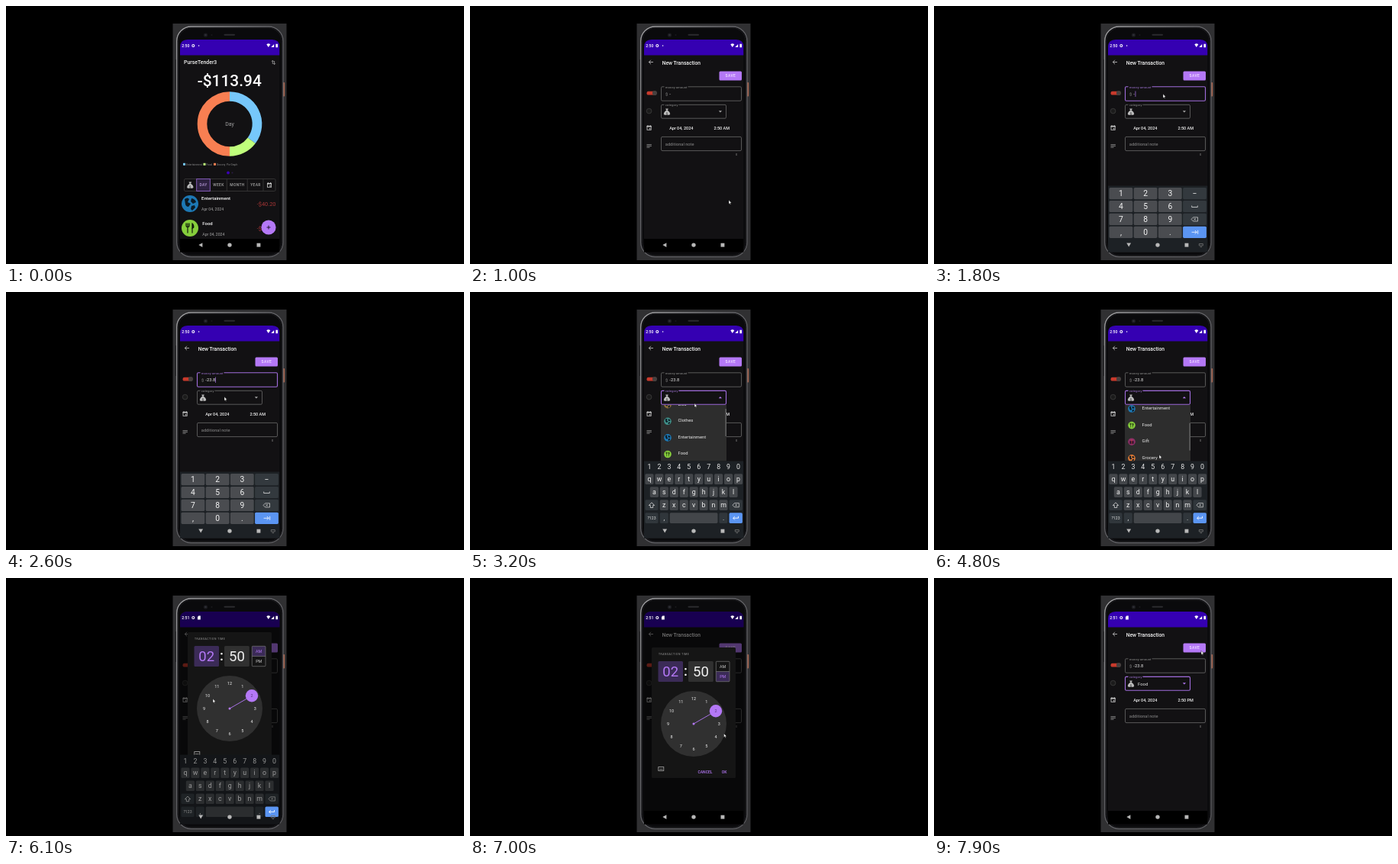
Write an HTML page that moves like this. It is 600x338 px and loops after 8000 ms.

```html
<!DOCTYPE html>
<html lang="en">
<head>
<meta charset="utf-8">
<title>Budget app</title>
<style>
html, body { margin: 0; width: 100%; height: 100%; overflow: hidden; background: #000; }
svg { display: block; width: 100vw; height: 100vh; font-family: Roboto, sans-serif; }
</style>
</head>
<body>
<svg id="stage" viewBox="0 0 600 338"></svg>
<script>
const LOOP = 8000;
const PURPLE = '#b478f6', PALE = '#e6e6e6', GREY = '#8c8c8c', DARK = '#121113';

// Markup helpers
const text = (x, y, s, size, fill = PALE, o = '') =>
  `<text x="${x}" y="${y}" font-size="${size}" fill="${fill}" ${o}>${s}</text>`;
const mid = (x, y, s, size, fill = PALE, o = '') => text(x, y, s, size, fill, `text-anchor="middle" ${o}`);
const rect = (x, y, w, h, fill, o = '') =>
  `<rect x="${x}" y="${y}" width="${w}" height="${h}" fill="${fill}" ${o}/>`;
const circle = (x, y, r, fill, o = '') => `<circle cx="${x}" cy="${y}" r="${r}" fill="${fill}" ${o}/>`;
const line = (d, stroke = PALE, w = 1, o = '') =>
  `<path d="${d}" fill="none" stroke="${stroke}" stroke-width="${w}" ${o}/>`;
const shape = (d, fill, o = '') => `<path d="${d}" fill="${fill}" ${o}/>`;
const group = (id, body, o = '') => `<g id="${id}" ${o}>${body}</g>`;
const BOLD = 'font-weight="500"';
const polar = (cx, cy, r, turn) => {
  const a = turn * 2 * Math.PI;
  return [cx + r * Math.sin(a), cy - r * Math.cos(a)];
};

const calendar = (x, y, c = PALE) =>
  rect(x - 2.6, y - 2.2, 5.2, 5, 'none', `stroke="${c}" stroke-width=".8"`) +
  line(`M${x - 3} ${y - 1.6}h6M${x - 1.6} ${y - 3.2}v1.5M${x + 1.6} ${y - 3.2}v1.5`, c, 1.1) +
  rect(x + .2, y + .6, 1.5, 1.4, c);
const moneyBag = (x, y) =>
  shape(`M${x - 1.8} ${y - 4}h3.6l-.9 2.2h-1.8zM${x - 1.2} ${y - 1.4}h2.4q3 2 3 4.2q0 1.4-1.4 1.4h-5.6q-1.4 0-1.4-1.4q0-2.2 3-4.2z`, '#bcbcbc') +
  mid(x, y + 3.5, '$', 4.2, '#222', BOLD);
const cutlery = (x, y, k) => `<g transform="translate(${x} ${y}) scale(${k})">` +
  line('M-3 -6.5v13M-5 -6.5v3.4q0 1.6 2 1.6t2-1.6v-3.4M3 0v6.5', '#10180a', 1.2) +
  shape('M2.4 -7q3 1 3 5.5q0 2-3 2.4z', '#10180a') + '</g>';
const globe = (x, y, k) => `<g transform="translate(${x} ${y}) scale(${k})">` +
  shape('M-7 -6q4-3 6 0l-2 4l4 2l-3 4q-3 0-4-3zM2 -7q5 1 6 5l-4 2l-3-3zM2 3l4-1l1 3l-4 4l-2-2z', '#0b1a24') + '</g>';

function field(id, x, y, w, h, label, gap) {
  return rect(x, y, w, h, 'none', `id="${id}" rx="1.5"`) +
    (label ? rect(x + 4, y - 1.5, gap, 3, DARK) + text(x + 5.3, y + 1.7, label, 4.3, GREY, `id="${id}Label"`) : '');
}

function donut() {
  const cx = 293, cy = 154.5, r = 36;
  return [[0, .353, '#76c7fb'], [.353, .5, '#c0ff7c'], [.5, 1, '#f87f52']].map(([from, to, color]) => {
    const [x0, y0] = polar(cx, cy, r, from), [x1, y1] = polar(cx, cy, r, to);
    return line(`M${x0} ${y0}A${r} ${r} 0 0 1 ${x1} ${y1}`, color, 12.6);
  }).join('') + mid(293, 157, 'Day', 7, '#a0a0a0');
}

function home() {
  const row = (x, y, name) => text(x, y, name, 6, '#fff', BOLD) + text(x, y + 14, 'Apr 04, 2024', 5.2, '#a8a8a8');
  const legend = [[232, '#76c7fb', 'Entertainment'], [258.5, '#c0ff7c', 'Food'], [272, '#f87f52', 'Grocery']]
    .map(([x, c, s]) => rect(x, 205.8, 3, 3, c) + text(x + 4, 208.6, s, 3.3, GREY)).join('');
  const tabs = [[258.5, 'DAY'], [278.5, 'WEEK'], [303, 'MONTH'], [327, 'YEAR']]
    .map(([x, s], i) => mid(x, 236.3, s, 4.9, i ? '#a6a6a6' : '#b79ad8', BOLD + ' letter-spacing=".35"')).join('');
  return text(233, 76.3, 'PurseTender3', 6.9, '#f2f2f2', BOLD) +
    line('M349.3 76v-4.4M348 72.8l1.3-1.4 1.3 1.4M351.6 72v4.4M350.3 75.2l1.3 1.4 1.3-1.4', '#bbb', .7) +
    mid(292.8, 105, '-$113.94', 20.9, '#fff', BOLD) + donut() +
    legend + text(289, 208.6, 'Pie Graph', 3.3, GREY) +
    circle(291, 218.5, 1.9, '#3a00b8') + circle(296.5, 218.5, 1, '#2a1c44') +
    rect(233.5, 226.5, 119.5, 16, 'none', 'rx="1.5" stroke="#3c3c3c" stroke-width=".8"') +
    line('M289.3 226.5v16M316.2 226.5v16M337 226.5v16', '#3c3c3c', .8) +
    rect(249.7, 226.5, 17.6, 16, '#2d2140', 'stroke="#8a5fc0" stroke-width=".9"') +
    moneyBag(241.3, 234.5) + tabs + calendar(345, 234.5, '#ccc') +
    circle(241, 259, 11, '#1d78b4') + globe(241, 259, 1) + row(256, 254.4, 'Entertainment') +
    text(328.7, 262, '-$40.20', 7.4, '#a83636') +
    circle(241, 291, 11, '#86ce3c') + cutlery(241, 291, 1) + row(257.3, 287, 'Food') +
    text(328.7, 294, '-$16.75', 7.4, '#a83636') +
    circle(344, 290, 9.6, PURPLE) + line('M341.5 290h5M344 287.5v5', '#1a1024', .9);
}

function form() {
  return line('M240 73.5h-5.6M237 70.8l-2.7 2.7 2.7 2.7', '#ccc', .8) +
    text(251.7, 76.5, 'New Transaction', 6.7, '#f4f4f4', BOLD) +
    rect(326.5, 85.5, 29.5, 12, PURPLE, 'rx="1.5"') +
    mid(341.4, 93.3, 'SAVE', 4.9, '#f3e4ff', BOLD + ' letter-spacing=".4"') +
    rect(231.5, 111.8, 11, 4.8, '#c83a2c', 'rx="2.2"') + circle(242, 114, 3.1, '#46403f') +
    field('amount', 250.5, 105.8, 105, 18.4, 'money amount', 31) +
    text(256, 117.4, '$', 5.8, GREY) + text(261.3, 117.4, '', 5.8, PALE, 'id="value"') +
    rect(273.8, 111.5, .7, 7.4, PURPLE, 'id="caret"') +
    circle(234.6, 137.6, 3.3, '#1c1c1c', 'stroke="#3c3c3c" stroke-width=".9"') +
    field('category', 250.5, 129.4, 85, 17.8, 'category', 19) +
    moneyBag(258, 138.5) + text(267, 140.6, 'Food', 5.9, PALE, 'id="picked"') +
    shape('M325.8 137.2h4.2l-2.1 2.2z', '#aaa', 'id="arrow"') +
    calendar(234.6, 159.5, '#ccc') + text(261.2, 161.6, 'Apr 04, 2024', 5.5, '#f0f0f0', BOLD) +
    text(319.4, 161.6, '2:50 AM', 5.5, '#f0f0f0', `id="when" ${BOLD}`) +
    line('M231.5 181.6h6.4M231.5 183.4h6.4M231.5 185.2h4', '#999', .8) +
    field('note', 250.5, 171.4, 105, 18.2) + text(255.8, 182.6, 'additional note', 5.7, GREY) +
    text(348, 195.5, '0', 4, GREY);
}

function dropdown() {
  const items = [['Bills', '#8a6d3b'], ['Clothes', '#3f8f88'], ['Entertainment', '#1d78b4'], ['Food', '#86ce3c'],
    ['Gift', '#8d2f66'], ['Grocery', '#e07a35'], ['Health', '#b33b3b']];
  const rows = items.map(([name, color], i) => {
    const y = 158 + i * 21.6;
    const art = name === 'Food' ? cutlery(259, y, .45) : name === 'Gift'
      ? rect(256.5, y - 1, 5, 3.6, '#25102a') + line(`M259 ${y - 3}v5.6`, '#e0443c', .8) : globe(259, y, .45);
    return circle(259, y, 4.8, color) + art + text(272.6, y + 1, name, 5.8, '#eee');
  }).join('');
  return rect(250, 148, 86, 73.5, '#2d2d2d') + `<g clip-path="url(#menuClip)">${group('items', rows)}</g>` +
    rect(334.6, 148, 1.1, 36, '#777', 'id="thumb"');
}

const keyCap = (x, y, w, h, fill) => rect(x, y, w, h, fill, 'rx="1.6"');
const backspace = (x, y) =>
  line(`M${x - 4} ${y}l2.4-2.6h6v5.2h-6zM${x - .6} ${y - 1.2}l2.4 2.4M${x + 1.8} ${y - 1.2}l-2.4 2.4`, '#ddd', .7);

function numberPad() {
  const rows = ['123−', '456␣', '789⌫', ',0.⇥'];
  return rect(228, 235.5, 130.5, 87, '#1d2125') + rows.map((row, r) => [...row].map((key, c) => {
    const x = 229.5 + c * 32.2, y = 238 + r * 16.9, cy = y + 7.6;
    const side = c === 3, last = r === 3;
    const cap = keyCap(x, y, 30.8, 15.2, !side ? '#4a4c50' : last ? '#5b95f2' : '#33393e');
    let mark = mid(x + 15.4, cy + 3.7, key, 10.3, '#f4f4f4');
    if (side && r === 1) mark = line(`M${x + 11.6} ${cy - 1}v2h7.6v-2`, '#ddd', .8);
    if (side && r === 2) mark = backspace(x + 15, cy);
    if (side && last) mark = line(`M${x + 11.5} ${cy}h6.4M${x + 15.8} ${cy - 2.3}l2.3 2.3-2.3 2.3M${x + 19.6} ${cy - 2.5}v5`, '#fff', .8);
    return cap + mark;
  }).join('')).join('');
}

function letters() {
  const row = (keys, x, y) => [...keys].map((k, i) =>
    keyCap(x + i * 12.95 - 5.6, y - 6.7, 11.2, 13.6, '#43464a') + mid(x + i * 12.95, y + 2.7, k, 8.8, '#f0f0f0')).join('');
  const digits = [...'1234567890'].map((k, i) => mid(235 + i * 12.95, 232.4, k, 8.8, '#e8e8e8')).join('');
  return rect(228, 221.5, 130.5, 101, '#1d2125') + digits +
    row('qwertyuiop', 235, 245) + row('asdfghjkl', 241.4, 262) + row('zxcvbnm', 254.3, 279) +
    keyCap(229.4, 272.3, 17.2, 13.6, '#30363b') + line('M238 275.8l-3.6 3.7h1.9v3h3.4v-3h1.9z', '#ddd', .8) +
    keyCap(339.5, 272.3, 17.4, 13.6, '#30363b') + backspace(348, 279.2) +
    keyCap(229.4, 289.3, 17.2, 13.6, '#30363b') + mid(238, 298, '?123', 5.2, '#ddd') +
    keyCap(248.7, 289.3, 11.2, 13.6, '#30363b') + mid(254.3, 298.5, ',', 8.5) +
    keyCap(261.7, 289.3, 62.8, 13.6, '#43464a') +
    keyCap(326.3, 289.3, 11.2, 13.6, '#30363b') + mid(332, 298.5, '.', 8.5) +
    rect(228, 221.5, 130.5, 101, '#000', 'id="keyShade"') +
    keyCap(339.5, 289.3, 17.4, 13.6, '#5b95f2') +
    line('M351.5 293.8v2.4h-6.6M346.8 294l-2.2 2.2 2.2 2.2', '#fff', .9);
}

function timeDialog() {
  const numbers = Array.from({ length: 12 }, (_, i) => {
    const [x, y] = polar(293, 171, 33.4, (i + 1) / 12);
    return mid(x.toFixed(2), (y + 1.9).toFixed(2), i + 1, 5.5, i === 1 ? '#5c3a80' : '#eee');
  }).join('');
  return rect(238, 71, 110, 171, '#151515', 'rx="1.5"') +
    text(247, 80.5, 'TRANSACTION TIME', 3.4, '#9a9a9a', 'letter-spacing=".55"') +
    rect(246.5, 89, 32.5, 27, '#3b2b57', 'rx="1.5"') + mid(262.7, 109, '02', 18.5, PURPLE) +
    mid(282.5, 108, ':', 18.5, '#fff', BOLD) +
    rect(286, 89, 32.8, 27, '#303030', 'rx="1.5"') + mid(302.4, 109, '50', 18.5, '#f0f0f0') +
    rect(322.3, 89.3, 17.7, 13.2, 'none', 'id="amBox"') + rect(322.3, 102.5, 17.7, 13.2, 'none', 'id="pmBox"') +
    rect(322.3, 89.3, 17.7, 26.4, 'none', 'rx="1" stroke="#777" stroke-width=".7"') + line('M322.3 102.5h17.7', '#777', .7) +
    mid(331.2, 97.8, 'AM', 5.4, PALE, 'id="am"') + mid(331.2, 111, 'PM', 5.4, PALE, 'id="pm"') +
    circle(293, 171, 43, '#303030') + line('M293 171L322 154.3', PURPLE, .9) +
    circle(293, 171, 1.5, PURPLE) + circle(322, 154.3, 8.2, PURPLE) + numbers +
    rect(246.8, 227.6, 7, 4.8, 'none', 'stroke="#aaa" stroke-width=".8"') + line('M248 230.6h4.6', '#aaa', .7) +
    mid(308, 235.7, 'CANCEL', 5, PURPLE, BOLD) + mid(333, 235.7, 'OK', 5, PURPLE, BOLD);
}

function statusIcons() {
  return text(230.3, 54, '', 5.2, '#fff', `id="clock" ${BOLD}`) +
    circle(245.3, 52, 1.5, 'none', 'stroke="#fff" stroke-width="1.1"') +
    circle(252.6, 52, .8, '#fff', 'id="dot"') +
    shape('M251 51l1.3-1.4h2.5v4.8h-3.8z', '#fff', 'id="card"') +
    shape('M341.3 50.3q2.5-1.9 5 0l-2.5 3.7zM347.3 54l3.9-4v4zM353.4 49.8h2.6v4.4h-2.6z', '#fff');
}

function phone() {
  return rect(218.5, 23, 149, 310, '#303032') +
    rect(362.5, 100, 2.6, 18.5, '#b06850', 'rx="1"') + rect(222, 70, 2, 40, '#1b1b1d') +
    rect(223.7, 27, 139.3, 301.5, '#08080a', 'rx="19" stroke="url(#rim)" stroke-width="1.3"') +
    rect(225.5, 28.8, 135.8, 298, '#0a0a0c', 'rx="17.5" stroke="#1e1e21" stroke-width="1"') +
    rect(285.5, 36.8, 14.5, 2, '#2b2b2e', 'rx="1"') +
    circle(261.5, 38, 2.6, '#1c1c20') + circle(261.5, 38, 1.1, '#33343c') + circle(269.5, 38, 1, '#1a1a1d');
}

document.getElementById('stage').innerHTML = `
  <defs>
    <linearGradient id="rim" x2="1" y2="1">
      <stop stop-color="#a4a4a6"/><stop offset=".45" stop-color="#626266"/><stop offset="1" stop-color="#58585c"/>
    </linearGradient>
    <clipPath id="screenClip"><path d="M228 322.5V54q0-10 10-10h110.5q10 0 10 10V322.5z"/></clipPath>
    <clipPath id="menuClip">${rect(250, 148, 86, 73.5, '#000')}</clipPath>
  </defs>` +
  rect(0, 0, 600, 338, '#000') + phone() +
  `<g clip-path="url(#screenClip)">` + rect(228, 44, 130.5, 279, DARK) + rect(228, 44, 130.5, 20.5, '#3500b2') +
  group('home', home()) + group('form', form()) + group('menu', dropdown()) +
  rect(228, 44, 130.5, 279, '#000', 'id="dim" opacity=".54"') + statusIcons() + group('dialog', timeDialog()) +
  group('pad', numberPad()) + group('letters', letters()) +
  rect(228, 305, 130.5, 18, '#000', 'id="navBack"') +
  shape('M257.4 310.2v5.8l-5-2.9z', '#b8b8b8', 'id="back"') + shape('M252.3 310.6h5.8l-2.9 5z', '#b8b8b8', 'id="hide"') +
  circle(293, 313.1, 2.7, '#b8b8b8') + rect(328.5, 310.7, 4.9, 4.9, '#b8b8b8') +
  line('M347.3 311.5h5v2.4h-5zM348.6 315.6h2.4', '#777', .8, 'id="imeIcon"') + '</g>' +
  group('cursor', shape('M0 -1.7v5.2l1.2-1.1.8 1.8.8-.4-.8-1.7h1.6z', '#fff', 'stroke="#000" stroke-width=".4"'));

const el = {};
document.querySelectorAll('[id]').forEach(node => { el[node.id] = node; });
const show = (id, on) => el[id].setAttribute('visibility', on ? 'visible' : 'hidden');
const set = (id, name, v) => el[id].setAttribute(name, v);
const write = (id, s) => { if (el[id].textContent !== s) el[id].textContent = s; };
const shift = (id, x, y) => set(id, 'transform', `translate(${x} ${y})`);

const ramp = (t, from, to) => Math.min(1, Math.max(0, (t - from) / (to - from)));
const smooth = u => u * u * (3 - 2 * u);

// Pointer stops: time, x, y
const stops = [[800, 343, 288], [1000, 339, 256], [1500, 300, 117], [1900, 300, 117], [2500, 286, 139],
  [2900, 286, 139], [3500, 302, 156], [4100, 302, 156], [4750, 295, 215], [4850, 295, 215], [5200, 282, 174],
  [5400, 282, 174], [5650, 328, 160], [5850, 328, 160], [6080, 271, 160], [6200, 271, 160], [6600, 332, 129],
  [6800, 332, 129], [7150, 333, 254], [7300, 333, 254], [7800, 350, 97]];

function pointer(t) {
  const next = stops.findIndex(s => s[0] > t);
  if (next < 0) return stops[stops.length - 1].slice(1);
  if (!next) return stops[0].slice(1);
  const [t0, x0, y0] = stops[next - 1], [t1, x1, y1] = stops[next];
  const u = smooth((t - t0) / (t1 - t0));
  return [x0 + (x1 - x0) * u, y0 + (y1 - y0) * u];
}

function outline(id, focused) {
  set(id, 'stroke', focused ? '#a06cdc' : '#6a6a6a');
  set(id, 'stroke-width', focused ? 1.1 : .8);
  if (el[id + 'Label']) set(id + 'Label', 'fill', focused ? '#9a6fcc' : GREY);
}

function draw(t) {
  const during = (a, b) => t >= a && t < b;
  const onHome = t < 800, menuOpen = during(2900, 5350), dialogOpen = during(6000, 7300);
  const amountFocus = during(1550, 2900), padOpen = during(1600, 2900), lettersOpen = during(2900, 6300);
  const isPm = t >= 6750;

  show('home', onHome);
  show('form', !onHome);
  show('menu', menuOpen);
  show('dim', dialogOpen);
  show('dialog', dialogOpen);
  show('pad', padOpen);
  show('letters', lettersOpen);

  write('clock', t < 5500 ? '2:50' : '2:51');
  show('dot', t < 5500);
  show('card', t >= 5500);

  const typed = Math.max(0, Math.min(4, Math.floor((t - 1700) / 200)));
  write('value', '-' + '23.8'.slice(0, typed));
  outline('amount', amountFocus);
  outline('category', t >= 2900);
  outline('note', false);
  show('caret', amountFocus && (t - 1550) % 1000 < 500 || during(2500, 2800));
  set('caret', 'x', [263.6, 266.9, 270.1, 271.7, 274][typed]);
  show('picked', !onHome && t >= 5350);
  set('arrow', 'transform', menuOpen ? 'rotate(180 327.9 138.2)' : '');
  set('arrow', 'fill', t >= 2900 ? PURPLE : '#aaa');
  write('when', t < 7300 ? '2:50 AM' : '2:50 PM');

  const scroll = 47.2 * smooth(ramp(t, 3050, 3550)) + ramp(t, 4200, 4700);
  shift('items', 0, -scroll);
  shift('thumb', 0, scroll * .49);

  shift('dialog', 0, 20 * smooth(ramp(t, 6200, 6350)));
  [['am', !isPm], ['pm', isPm]].forEach(([id, on]) => {
    set(id, 'fill', on ? PURPLE : '#ccc');
    set(id + 'Box', 'fill', on ? '#3b2b57' : 'none');
  });
  const leave = ramp(t, 6000, 6300);
  shift('letters', 0, 90 * leave * leave);
  set('keyShade', 'opacity', dialogOpen ? .36 : 0);

  const keys = padOpen || lettersOpen;
  set('navBack', 'fill', keys ? '#1d2125' : '#000');
  set('navBack', 'opacity', during(6000, 6300) ? 0 : 1);
  show('back', !keys);
  show('hide', keys);
  show('imeIcon', keys);

  show('cursor', !onHome);
  shift('cursor', ...pointer(t));
}

function tick(now) {
  draw(now % LOOP);
  requestAnimationFrame(tick);
}
draw(0);
requestAnimationFrame(tick);
</script>
</body>
</html>
```
